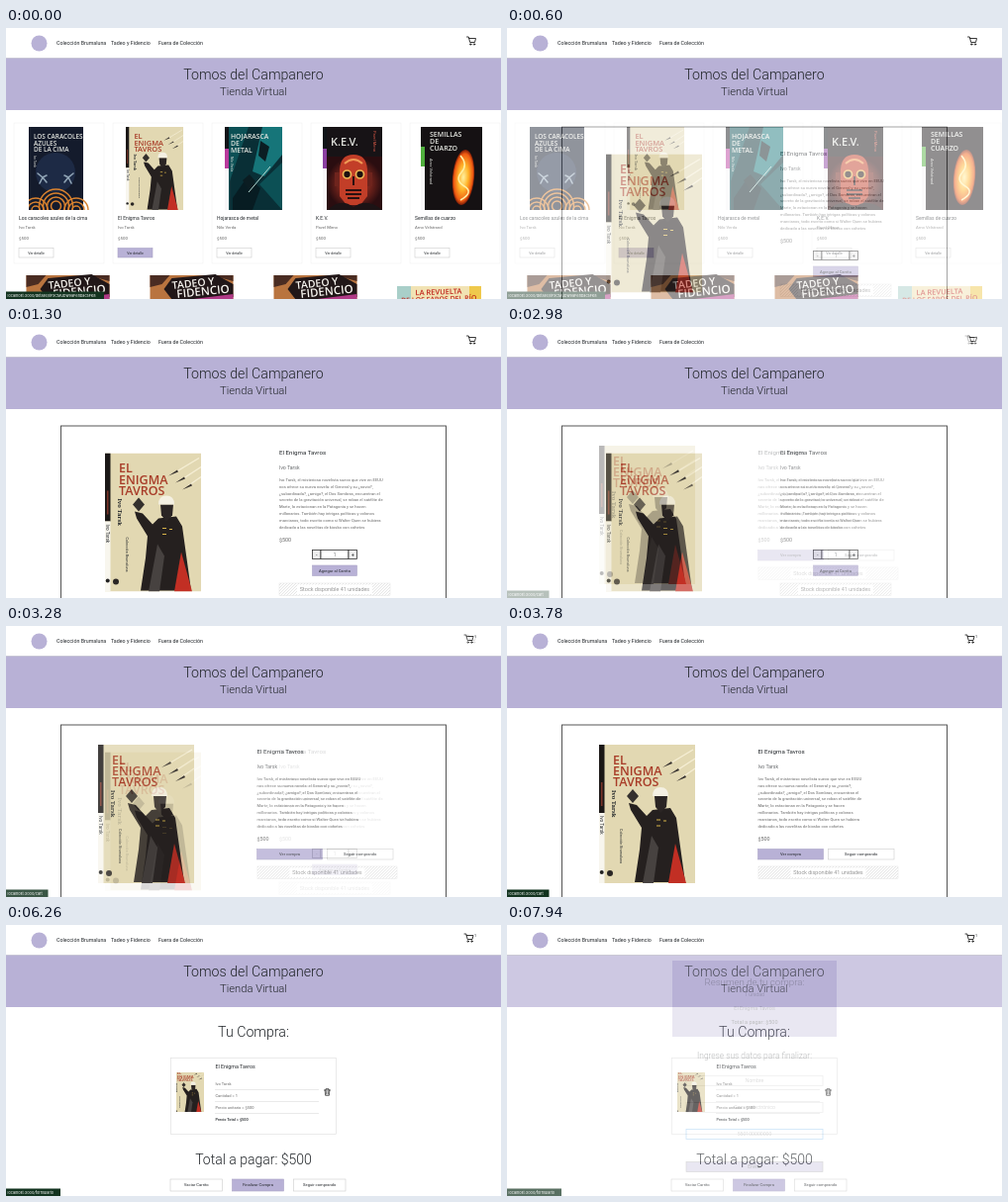
Write an HTML page that moves like this. It is 500x274 px and loops after 8000 ms.

```html
<!DOCTYPE html>
<html lang="es">
<head>
<meta charset="utf-8">
<title>Tienda Virtual</title>
<style>
  html, body { margin: 0; height: 100%; overflow: hidden; background: #fff; }
  svg { display: block; width: 100vw; height: 100vh; }
  text { font-family: Roboto, "Open Sans", sans-serif; fill: #212529; }
  .light { font-weight: 300; }
  .mid { text-anchor: middle; }
  .soft { fill: #666; }
  .bold { font-weight: 500; }
  .art { font-family: "Open Sans", "Noto Sans", Roboto, sans-serif; font-stretch: 75%; font-weight: 600; }
  .serif { font-family: "Noto Serif", "Liberation Serif", serif; font-weight: 700; }
  .pale { fill: #e4e6e0; }
  .rust { fill: #a83c28; }
  .red { fill: #c0241c; }
  .status { font-family: Inter, "Open Sans", sans-serif; fill: #fff; }
  .icon { fill: none; stroke: #222; stroke-width: .9; stroke-linecap: round; stroke-linejoin: round; }
</style>
</head>
<body>
<svg id="stage" viewBox="0 0 500 274" preserveAspectRatio="none">
  <defs>
    <pattern id="hatch" width="3" height="3" patternUnits="userSpaceOnUse">
      <path d="M-1 1L1 -1M0 3L3 0M2 4L4 2" stroke="#ccc" stroke-width=".5"/>
    </pattern>
    <radialGradient id="flame">
      <stop offset="0" stop-color="#fff0a0"/><stop offset=".45" stop-color="#ffb52a"/>
      <stop offset=".85" stop-color="#ef5a12"/><stop offset="1" stop-color="#7a1c08"/>
    </radialGradient>
    <radialGradient id="glow">
      <stop offset="0" stop-color="#d8432c"/><stop offset="1" stop-color="#2a0d10"/>
    </radialGradient>
    <clipPath id="thumb"><rect x="172" y="149" width="28" height="40"/></clipPath>
    <clipPath id="page"><rect width="97" height="140"/></clipPath>
    <clipPath id="small"><rect width="62" height="84"/></clipPath>

    <g id="enigma" clip-path="url(#page)">
      <rect width="97" height="140" fill="#e2d8b2"/>
      <rect width="5.5" height="69" fill="#1b1817"/>
      <rect y="69" width="5.5" height="71" fill="#f8f6ee"/>
      <path d="M2.7 38V62" stroke="#7a3328" stroke-width="1.6"/>
      <circle cx="2.7" cy="129" r="2" fill="#222"/>
      <text class="art rust" x="14" y="19.5" font-size="12.5">EL</text>
      <text class="art rust" x="14" y="31" font-size="12.5">ENIGMA</text>
      <text class="art rust" x="14" y="42" font-size="12.5">TAVROS</text>
      <text class="serif" transform="translate(13 46)rotate(90)" font-size="5.8">Ivo Tarsk</text>
      <text transform="translate(1.2 72)rotate(90)" font-size="4.7">Ivo Tarsk</text>
      <text transform="translate(21 85)rotate(90)" font-size="3.7">Colección Brumaluna</text>
      <path d="M70 20L95 5M77 27L97 14M84 33L97 24" stroke="#f6efd6" stroke-width="1.2"/>
      <path d="M64 23l9 -6l1 2zM71 30l9 -6l1 2zM78 37l9 -6l1 2z" fill="#38332f"/>
      <path d="M54 66L72 64L78 74L87 139H36L41 106L43 84L32 66L30 59L38 61L48 72z" fill="#25201f"/>
      <path d="M77 100L88 140H70z" fill="#c22f24"/>
      <path d="M34 45L40 52L34 59L28 52z" fill="#34302d"/>
      <path d="M56 52H69L68 63L62 69L57 63z" fill="#2b2524"/>
      <path d="M54 52Q54 43 62 43T70 52z" fill="#f4f0e2"/>
      <path d="M58 76h4M65 77h3M58 82h4" stroke="#d9b54a" stroke-width="1.2"/>
      <path d="M53 92L60 104L55 140H44z" fill="#474240"/>
      <circle cx="11" cy="130" r="3" fill="#2a2624"/>
    </g>

    <g id="snails" clip-path="url(#small)">
      <rect width="55" height="84" fill="#141b2c"/>
      <circle cx="27" cy="46" r="20" fill="#1d2a45"/>
      <g fill="none" stroke="#8fa3b4" stroke-width="1.6" stroke-linecap="round">
        <path d="M9 47l5 4l4 -2M14 51l-3 6M14 51l4 5M45 47l-5 4l-4 -2M40 51l3 6M40 51l-4 5"/>
      </g>
      <g fill="none" stroke="#d9822f" stroke-width="1.5">
        <circle cx="7" cy="84" r="4"/><circle cx="7" cy="84" r="8"/><circle cx="7" cy="84" r="12"/>
        <circle cx="48" cy="84" r="4"/><circle cx="48" cy="84" r="8"/><circle cx="48" cy="84" r="12"/>
        <circle cx="27.500" cy="80" r="5"/><circle cx="27.500" cy="80" r="9"/>
        <circle cx="27.500" cy="80" r="13"/><circle cx="27.500" cy="80" r="17"/>
      </g>
      <text class="art pale" x="5" y="12" font-size="6.4">LOS CARACOLES</text>
      <text class="art pale" x="5" y="18.500" font-size="6.4">AZULES</text>
      <text class="art pale" x="5" y="25" font-size="6.4">DE LA CIMA</text>
      <text class="pale" transform="translate(5 29)rotate(90)" font-size="3">Ivo Tarsk</text>
    </g>

    <g id="leaves" clip-path="url(#small)">
      <rect width="58" height="84" fill="#0c5055"/>
      <path d="M24 0H58V36L35 58L58 84H5V55z" fill="#092f36"/>
      <path d="M38 0L58 0V28L40 50L28 45z" fill="#167579"/>
      <path d="M8 72L23 50L36 62L28 84H8z" fill="#071c22"/>
      <path d="M36 14L45 20L41 35L34 29zM18 54L25 48L31 55L24 64z" fill="#0b1d22"/>
      <path d="M24 66L46 40" stroke="#b7dad2" stroke-width="1"/>
      <rect width="4" height="22" fill="#101418"/><rect y="22" width="4" height="20" fill="#b83a9c"/>
      <rect y="42" width="4" height="42" fill="#f8f6f8"/>
      <text class="art pale" x="6" y="12" font-size="6.8">HOJARASCA</text>
      <text class="art pale" x="6" y="19" font-size="6.8">DE</text>
      <text class="art pale" x="6" y="26" font-size="6.8">METAL</text>
      <text class="pale" transform="translate(6 30)rotate(90)" font-size="3.3">Nilo Verda</text>
    </g>

    <g id="robot" clip-path="url(#small)">
      <rect width="60" height="84" fill="#171316"/>
      <path d="M4 84V30H60V84z" fill="url(#glow)"/>
      <path d="M17 70V43Q18 28 31 28T45 43V70L38 79H24z" fill="#c23e28"/>
      <path d="M22 37Q31 29 40 37" fill="none" stroke="#f09a55" stroke-width="2"/>
      <g fill="#1d1110" stroke="#edb654" stroke-width="1.7">
        <circle cx="24.5" cy="48" r="4"/><circle cx="37.5" cy="48" r="4"/>
      </g>
      <path d="M31 50V59M23 64H39M23 68H39M25 72H37" stroke="#2a1010" stroke-width="2"/>
      <path d="M12 46H17V60H12zM45 46H50V60H45z" fill="#6f241d"/>
      <path d="M5 84Q18 71 31 81Q45 71 60 84z" fill="#1c1315"/>
      <rect width="4" height="22" fill="#101418"/><rect y="22" width="4" height="20" fill="#8a3fa0"/>
      <rect y="42" width="4" height="42" fill="#f8f6f8"/>
      <text class="art pale" x="8" y="19" font-size="11">K.E.V.</text>
      <text transform="translate(51 4)rotate(90)" font-size="4" style="fill:#dc5a48">Pavel Mirno</text>
    </g>

    <g id="quartz" clip-path="url(#small)">
      <rect width="62" height="84" fill="#151113"/>
      <rect y="20" width="4" height="20" fill="#4fae3c"/><rect y="40" width="4" height="44" fill="#f8f6f8"/>
      <ellipse cx="43" cy="51" rx="11" ry="28" fill="url(#flame)" transform="rotate(5 43 51)"/>
      <path d="M40 29Q48 38 41 46T44 60T40 74" fill="none" stroke="#fff0a5" stroke-width="1.5"/>
      <text class="art pale" x="9" y="10" font-size="7">SEMILLAS</text>
      <text class="art pale" x="9" y="17" font-size="7">DE</text>
      <text class="art pale" x="9" y="24" font-size="7">CUARZO</text>
      <text class="pale" transform="translate(9 32)rotate(90)" font-size="4">Arno Velstrand</text>
    </g>

    <g id="saga">
      <rect width="84" height="30" fill="#b9743f"/>
      <path d="M0 0H20L12 9L0 12zM62 0H84V6z" fill="#4a2c22"/>
      <path d="M22 3L66 -1L84 9V22L24 27L14 14z" fill="#211718"/>
      <path d="M44 24L84 19V24H44z" fill="#b03a86"/>
      <g transform="rotate(-6 46 12)">
        <text class="art mid" x="44" y="11.5" font-size="10.5" style="fill:#f8f6f0">TADEO Y</text>
        <text class="art mid" x="53" y="21" font-size="11.5" style="fill:#f8f6f0">FIDENCIO</text>
      </g>
    </g>

    <g id="cart" class="icon">
      <path d="M0 .5H1.8L3.2 6H8L9 2H2.2"/>
      <circle cx="3.7" cy="8" r=".7"/><circle cx="7.5" cy="8" r=".7"/>
    </g>
  </defs>
</svg>
<script>
const LILAC = '#b8b1d6';
const LOOP = 8000;
const STEP = 100;
const STEPS = 9;
const STARTS = [500, 2980, 5460, 7940];

const text = (x, y, size, str, cls = '') =>
  `<text x="${x}" y="${y}" font-size="${size}" class="${cls}">${str}</text>`;
const rect = (x, y, w, h, fill, stroke = 'none', sw = .6) =>
  `<rect x="${x}" y="${y}" width="${w}" height="${h}" fill="${fill}" stroke="${stroke}" stroke-width="${sw}"/>`;
const use = (id, x, y, k = 1) =>
  `<use href="#${id}" transform="translate(${x} ${y})scale(${k})"/>`;
const button = (x, y, w, h, label, fill = '#fff', size = 4.1) =>
  rect(x, y, w, h, fill, fill === LILAC ? '#aaa4c6' : '#ccc') +
  text(x + w / 2, y + h / 2 + size * .36, size, label, 'mid');

const navBar = count => rect(0, 0, 500, 30, '#fff') +
  `<circle cx="33.5" cy="15.5" r="8" fill="${LILAC}"/>` +
  text(51, 17, 5.3, 'Colección Brumaluna') +
  text(106, 17, 5.3, 'Tadeo y Fidencio') +
  text(154, 17, 5.3, 'Fuera de Colección') +
  use('cart', count ? 463 : 465.5, 8.5) +
  (count ? text(473, 11.5, 3.8, count) : '') +
  rect(0, 30, 500, .6, '#bbb');

const header = count => navBar(count) + rect(0, 30.5, 500, 52.5, LILAC) +
  text(250, 52, 14.2, 'Tomos del Campanero', 'mid light') +
  text(250, 68.3, 11.2, 'Tienda Virtual', 'mid light');

const statusBar = (w, url) => rect(0, 266.5, w, 7.5, '#12331f') + text(1.5, 271.6, 3.8, url, 'status');

const books = [
  ['snails', 23, 1, 'Los caracoles azules de la cima', 'Ivo Tarsk'],
  ['enigma', 121, .6, 'El Enigma Tavros', 'Ivo Tarsk'],
  ['leaves', 221, 1, 'Hojarasca de metal', 'Nilo Verda'],
  ['robot', 320, 1, 'K.E.V.', 'Pavel Mirno'],
  ['quartz', 419, 1, 'Semillas de cuarzo', 'Arno Velstrand']
];

const card = ([id, cx, k, title, author], i) => {
  const x = 13 + 100 * i;
  return rect(x - 5, 96, 91, 142, 'none', '#f0f0f0') + use(id, cx, 100, k) +
    text(x, 193.5, 4.9, title) +
    text(x, 202.5, 4.2, author, 'soft') +
    text(x, 213.5, 4.4, '$500', 'soft') +
    button(x, 222.5, 35, 9.5, 'Ver detalle', i === 1 ? LILAC : '#fff', 3.5);
};

const revolt = rect(395, 261, 85, 13, '#f1e3b4') + rect(395, 261, 14, 13, '#a9cfc9') + rect(468, 261, 12, 13, '#efc94c') +
  '<g transform="rotate(-2 437 268)">' +
  text(437, 269.5, 7.5, 'LA REVUELTA', 'art mid red') +
  text(437, 276.5, 7, 'DE LOS FAROS DEL RÍO', 'art mid red') + '</g>';

const blurb = [
  'Ivo Tarsk, el misterioso novelista sueco que vive en EEUU',
  'nos ofrece su nueva novela: el General y su ¿novio?,',
  '¿subordinada?, ¿amigo?, el Dos Sombras, encuentran el',
  'secreto de la gravitación universal, se roban el satélite de',
  'Marte, lo estacionan en la Patagonia y se hacen',
  'millonarios. También hay intrigas políticas y colonos',
  'marcianos, todo escrito como si Walter Quen se hubiera',
  'dedicado a las novelitas de kiosko con cohetes'
];

const detail = (x, bx, by) => rect(55.5, 100, 389, 190, '#fff', '#444', .9) +
  use('enigma', bx, by) +
  text(x, 129.2, 6.2, 'El Enigma Tavros') +
  text(x, 143.5, 5.2, 'Ivo Tarsk', 'light') +
  blurb.map((line, i) => text(x, 156 + 6.8 * i, 4.15, line, 'soft')).join('') +
  text(x, 217, 5.4, '$500', 'soft');

const stock = (x, y, w, h) => rect(x, y, w, h, 'url(#hatch)', '#ddd', .4) +
  rect(x + w / 2 - 38, y + 1.5, 76, h - 3, '#fff') +
  text(x + w / 2, y + h / 2 + 2, 5.5, 'Stock disponible 41 unidades', 'mid soft light');

const quantity = rect(309.5, 225.5, 8.5, 9, '#eee', '#333', .8) + rect(318, 225.5, 28, 9, '#fff', '#333', .8) +
  rect(346, 225.5, 8.5, 9, '#eee', '#333', .8) +
  text(313.7, 231.7, 5.5, '-', 'mid') + text(332, 231.7, 4.6, '1', 'mid light') + text(350.2, 232, 5.5, '+', 'mid');

const rows = ['Ivo Tarsk', 'Cantidad = 1', 'Precio unitario = $500'];
const trash = '<path class="icon" style="stroke-width:.7" d="M321.5 167H327.5M323 167V165.7H326V167M322.2 167L322.6 172.3H326.4L326.8 167M323.7 168.5V171M325.3 168.5V171"/>';

const field = (y, label, stroke = '#ccc') => rect(181, y, 138, 10, '#fff', stroke, .8) +
  text(250, y + 6.9, 5.2, label, 'mid soft light');

const scenes = [
  header() + books.map(card).join('') + [20.5, 145.5, 270.5].map(x => use('saga', x, 250)).join('') +
    revolt + statusBar(99, 'localhost:3000/detalle/IiFxCMuDw9aF6hbac5Fk8'),

  header() + detail(276, 100, 127.5) + quantity +
    button(309.5, 241, 45, 10.5, 'Agregar al Carrito', LILAC) + stock(276, 259, 112, 12.5),

  header(1) + detail(253.5, 93, 120) + button(253.5, 225.5, 66, 10.5, 'Ver compra', LILAC) +
    button(324.5, 225.5, 66.5, 10.5, 'Seguir comprando') + stock(254, 243, 141, 12.5) +
    statusBar(42.5, 'localhost:3000/cart'),

  header(1) + text(250, 113, 14.2, 'Tu Compra:', 'mid light') + rect(166.5, 134.5, 167, 77, '#fff', '#ddd') +
    `<g clip-path="url(#thumb)">${use('enigma', 168, 144, .34)}</g>` +
    text(211.5, 145, 5.3, 'El Enigma Tavros') +
    rows.map((s, i) => text(211.5, 161.7 + 12 * i, 4, s, 'soft') + rect(211, 166.2 + 12 * i, 105, .6, '#ddd')).join('') +
    text(211.5, 198, 3.85, 'Precio Total = $500', 'bold') + trash +
    text(250, 242, 14, 'Total a pagar: $500', 'mid light') +
    button(166, 257, 52.5, 12, 'Vaciar Carrito') + button(228.5, 257, 52, 12, 'Finalizar Compra', LILAC) +
    button(290.5, 257, 52.5, 12, 'Seguir comprando') + statusBar(55, 'localhost:3000/formulario'),

  navBar(1) + rect(167, 36, 166, 77, LILAC) +
    text(250, 61, 9.7, 'Resumen de tu compra:', 'mid light') +
    text(250, 72, 5.3, '1 unidad', 'mid light') + text(250, 85.5, 5.5, 'El Enigma Tavros', 'mid light') +
    text(250, 100, 5.5, 'Total a pagar: $500', 'mid') +
    text(250, 135, 8.4, 'Ingrese sus datos para finalizar:', 'mid light') +
    field(152.5, 'Nombre') + field(179.5, 'Correo electrónico') + field(206.5, '550100000000', '#58a6e8') +
    rect(181, 239.5, 138, 10, LILAC, '#777') + text(250, 246.3, 5, 'Enviar', 'mid')
];

document.getElementById('stage').insertAdjacentHTML('beforeend',
  scenes.map(s => `<g class="scene">${rect(0, 0, 500, 274, '#fff')}${s}</g>`).join(''));
const layers = [...document.querySelectorAll('.scene')];

// Stepped crossfade that slows towards the end.
const fade = (t, start) => {
  const k = Math.floor((t - start) / STEP) + 1;
  const p = Math.min(Math.max(k / STEPS, 0), 1);
  return 1 - (1 - p) ** 3;
};

function draw(now) {
  const t = now % LOOP;
  STARTS.forEach((start, i) => {
    const a = fade(t, start);
    layers[i + 1].style.opacity = a;
    layers[i + 1].style.visibility = a ? 'visible' : 'hidden';
  });
}

const begun = performance.now();
function tick() {
  draw(performance.now() - begun);
  requestAnimationFrame(tick);
}
tick();
</script>
</body>
</html>
```
